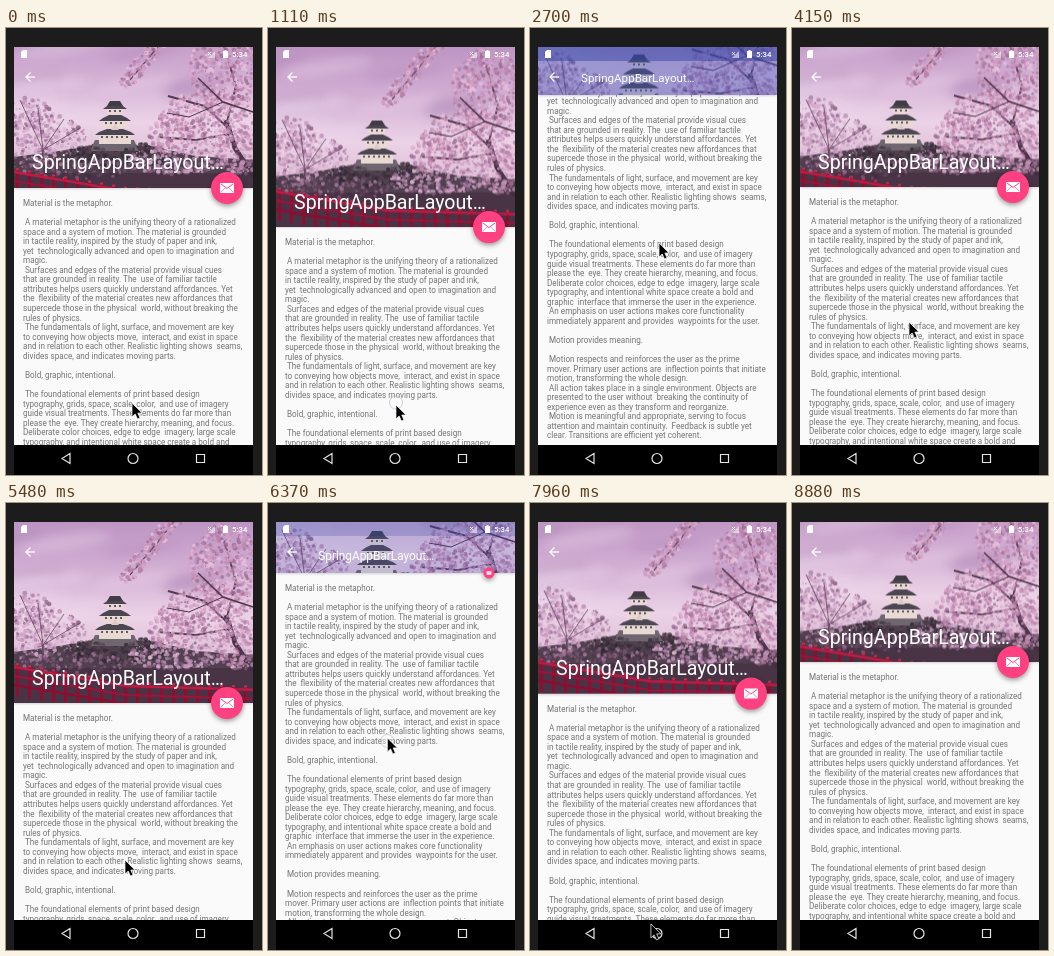
Animation of 256x447 px, one loop 9.34 s. Source, as an HTML page with a canvas:

```html
<!DOCTYPE html>
<html lang="en">
<head>
<meta charset="utf-8">
<title>Spring app bar</title>
<style>
  html, body { margin: 0; width: 100%; height: 100%; overflow: hidden; background: #1c1c1c; }
  canvas { display: block; width: 256px; height: 447px; }
</style>
</head>
<body>
<canvas id="stage"></canvas>
<script>
const W = 256, H = 447, LOOP = 9340;
const LEFT = 8, TOP = 19, RIGHT = 247, BOTTOM = 417, WIDE = RIGHT - LEFT;
const EXPANDED = 159, COLLAPSED = 67;
const LINE = 9.55;
const canvas = document.getElementById('stage');
const dpr = window.devicePixelRatio || 1;
canvas.width = W * dpr;
canvas.height = H * dpr;
const ctx = canvas.getContext('2d');

const copy = `Material is the metaphor.

 A material metaphor is the unifying theory of a rationalized
space and a system of motion. The material is grounded
in tactile reality, inspired by the study of paper and ink,
yet  technologically advanced and open to imagination and
magic.
 Surfaces and edges of the material provide visual cues
that are grounded in reality. The  use of familiar tactile
attributes helps users quickly understand affordances. Yet
the  flexibility of the material creates new affordances that
supercede those in the physical  world, without breaking the
rules of physics.
 The fundamentals of light, surface, and movement are key
to conveying how objects move,  interact, and exist in space
and in relation to each other. Realistic lighting shows  seams,
divides space, and indicates moving parts.

 Bold, graphic, intentional.

 The foundational elements of print based design
typography, grids, space, scale, color,  and use of imagery
guide visual treatments. These elements do far more than
please the  eye. They create hierarchy, meaning, and focus.
Deliberate color choices, edge to edge  imagery, large scale
typography, and intentional white space create a bold and
graphic  interface that immerse the user in the experience.
 An emphasis on user actions makes core functionality
immediately apparent and provides  waypoints for the user.

 Motion provides meaning.

 Motion respects and reinforces the user as the prime
mover. Primary user actions are  inflection points that initiate
motion, transforming the whole design.
 All action takes place in a single environment. Objects are
presented to the user without  breaking the continuity of
experience even as they transform and reorganize.
 Motion is meaningful and appropriate, serving to focus
attention and maintain continuity.  Feedback is subtle yet
clear. Transitions are efficient yet coherent.`.split('\n');

// Each key: [ms, value, ease into it]
const linear = k => k;
const out = k => 1 - (1 - k) ** 3;
const soft = k => k * k * (3 - 2 * k);
const headerKeys = [
  [0, 160], [80, 159], [520, 159], [1080, 199, out], [1300, 199.5], [1800, 159, out],
  [2130, 159], [2480, 67], [3380, 67], [3800, 159, out], [4600, 159],
  [5300, 200, out], [5520, 200], [5950, 159, out], [6100, 159], [6380, 67],
  [6860, 67], [7130, 159], [7340, 180, out], [7800, 197, out], [7930, 197], [8450, 159, out]];
const scrollKeys = [
  [2480, 0], [2700, -56.5], [2850, -61, out], [3150, -61], [3380, 0],
  [6380, 0], [6520, -50, out], [6650, -50], [6860, 0]];
const scrimKeys = [
  [2430, 0], [3030, 1], [3540, 1], [4100, 0], [6250, 0], [6750, 0.9], [6990, 0.9], [7640, 0]];
const fabKeys = [
  [2330, 1], [2530, 0], [3520, 0], [3720, 1], [6240, 1], [6440, 0], [6980, 0], [7180, 1]];
const xKeys = [
  [0, 126], [480, 127], [1100, 128], [1900, 125], [2130, 125], [2700, 129], [3150, 129],
  [4150, 117, soft], [5480, 119], [7900, 120], [8850, 197, soft], [8900, 204]];
const yKeys = [
  [0, 375], [480, 245, soft], [1100, 377, soft], [2130, 377], [2700, 215], [3150, 215],
  [3800, 372, soft], [4150, 294], [4500, 240, soft], [4600, 240], [5300, 357, soft],
  [5520, 357], [6050, 382, soft], [6100, 382], [6520, 228, out], [6650, 228],
  [7320, 386, soft], [7850, 420, soft], [8850, 446, soft], [8900, 452]];
const presses = [[520, 1300], [2130, 2680], [3150, 3800], [4600, 5440], [6100, 6500], [6650, 7900]];

function at(keys, t) {
  if (t <= keys[0][0]) return keys[0][1];
  for (let i = 1; i < keys.length; i++) {
    const [t0, v0] = keys[i - 1], [t1, v1, ease = linear] = keys[i];
    if (t < t1) return v0 + (v1 - v0) * ease((t - t0) / (t1 - t0));
  }
  return keys[keys.length - 1][1];
}

function seeded(seed) {
  return () => (seed = (seed * 16807) % 2147483647) / 2147483647;
}

function poly(c, color, ...pts) {
  c.fillStyle = color;
  c.beginPath();
  for (let i = 0; i < pts.length; i += 2) c.lineTo(pts[i], pts[i + 1]);
  c.fill();
}

function stroke(c, color, width, ...pts) {
  c.strokeStyle = color;
  c.lineWidth = width;
  c.beginPath();
  for (let i = 0; i < pts.length; i += 2) c.lineTo(pts[i], pts[i + 1]);
  c.stroke();
}

function disc(c, color, x, y, r) {
  c.fillStyle = color;
  c.beginPath();
  c.arc(x, y, r, 0, 7);
  c.fill();
}

// Soft speckled cluster of petals
function petals(c, rnd, x, y, rx, ry, count, colors) {
  for (let i = 0; i < count; i++) {
    const a = rnd() * 6.283, d = Math.sqrt(rnd());
    c.globalAlpha = 0.45 + rnd() * 0.4;
    disc(c, colors[i % colors.length], x + Math.cos(a) * d * rx, y + Math.sin(a) * d * ry, 0.7 + rnd() * 1.7);
  }
  c.globalAlpha = 1;
}

function castle(c) {
  poly(c, '#6f6670', 84, 143, 89, 132, 128, 132, 133, 143);
  const tiers = [[96, 8, 7], [108, 12, 9], [122, 16, 11]];
  for (const [y, half, tall] of tiers) {
    c.fillStyle = '#e8d9d3';
    c.fillRect(109 - half, y + 3, half * 2, tall);
    c.fillStyle = '#625765';
    for (let x = 111 - half; x < 107 + half; x += 5) c.fillRect(x, y + 6, 2, 2);
    poly(c, '#4c4650', 105 - half, y + 5, 109 - half, y + 2, 109 - half * 0.5, y - 1,
      109 + half * 0.5, y - 1, 109 + half, y + 2, 113 + half, y + 5);
  }
  poly(c, '#403b45', 101, 98, 104, 93, 114, 93, 117, 98);
  poly(c, '#dccac8', 105, 122, 109, 116, 113, 122);
}

function fence(c) {
  const rail = x => x < 120 ? 164 + (x - 8) * 0.17 : 183 + (x - 120) * 0.03;
  for (let x = 10; x < RIGHT; x += 12) {
    const y = rail(x);
    c.fillStyle = '#8f0d31';
    c.fillRect(x, y - 3, 3, 32);
    c.fillStyle = '#d02a50';
    c.fillRect(x, y - 4, 3, 2);
  }
  for (const [dy, w, color] of [[0, 2.6, '#c01a43'], [9, 2, '#a11238'], [18, 2.4, '#8d0d30']])
    stroke(c, color, w, 8, rail(8) + dy, 120, 183 + dy, RIGHT, rail(RIGHT) + dy);
}

// Scenery, laid out for a header that ends at y = 200
function paintScene() {
  const pic = document.createElement('canvas');
  pic.width = W * dpr;
  pic.height = 230 * dpr;
  const c = pic.getContext('2d'), rnd = seeded(77);
  c.scale(dpr, dpr);
  const sky = c.createLinearGradient(0, 10, 0, 150);
  sky.addColorStop(0, '#b990bf');
  sky.addColorStop(0.4, '#d2aed4');
  sky.addColorStop(0.75, '#ecd3e7');
  sky.addColorStop(1, '#dfc0d8');
  c.fillStyle = sky;
  c.fillRect(0, 0, W, 230);
  c.filter = 'blur(5px)';
  for (let i = 0; i < 14; i++) {
    c.globalAlpha = 0.3;
    c.fillStyle = i % 3 ? '#f0dcf0' : '#a57fb0';
    c.beginPath();
    c.ellipse(rnd() * 190, 25 + rnd() * 85, 30 + rnd() * 25, 4 + rnd() * 5, -0.15, 0, 7);
    c.fill();
  }
  c.filter = 'none';
  c.globalAlpha = 1;

  const mauve = ['#b988b1', '#d0a2c7', '#8f6389', '#deb9d5'];
  const pink = ['#d39dc1', '#e9c1dc', '#b77fa8', '#c68fb6', '#9a6791'];
  const dark = ['#382d3a', '#4b3d48', '#2c2932', '#594453'];
  poly(c, '#51404f', 8, 149, 60, 142, 90, 137, 145, 138, 190, 148, 247, 152, 247, 230, 8, 230);
  petals(c, rnd, 32, 129, 48, 25, 390, mauve);
  petals(c, rnd, 22, 106, 25, 16, 110, mauve);
  for (const [x, y] of [[14, 92], [32, 100], [58, 111], [74, 120]])
    stroke(c, '#67485f', 0.8, 36, 164, 37, 142, x, y);
  petals(c, rnd, 112, 148, 54, 12, 260, dark);
  castle(c);
  petals(c, rnd, 84, 147, 18, 8, 65, dark);
  petals(c, rnd, 139, 145, 20, 10, 80, dark);
  petals(c, rnd, 68, 160, 62, 11, 190, ['#795571', '#a97a9d', '#4b374a']);
  petals(c, rnd, 171, 153, 50, 14, 240, mauve);

  stroke(c, '#4d344a', 5, 247, 168, 229, 140, 220, 112);
  stroke(c, '#56394f', 2.2, 220, 118, 198, 98, 162, 88);
  stroke(c, '#56394f', 1.8, 224, 126, 190, 132, 152, 129);
  stroke(c, '#56394f', 2, 221, 114, 230, 78, 218, 38);
  petals(c, rnd, 220, 61, 36, 40, 500, pink);
  petals(c, rnd, 205, 111, 52, 29, 560, pink);
  petals(c, rnd, 166, 127, 23, 19, 150, pink);
  petals(c, rnd, 233, 147, 20, 20, 150, pink);
  stroke(c, '#51354b', 1.5, 247, 104, 217, 94, 192, 70);
  stroke(c, '#51354b', 1, 217, 94, 183, 109, 161, 105);

  stroke(c, '#61445d', 1.2, 176, 8, 151, 40, 124, 72);
  for (let i = 0; i < 7; i++)
    petals(c, rnd, 167 - i * 7.5, 18 + i * 9, 9, 7, 30, pink);
  c.fillStyle = 'rgba(55,25,50,.3)';
  c.fillRect(0, 165, W, 65);
  fence(c);
  return pic;
}
const scene = paintScene();

function drawText(h, scroll) {
  ctx.fillStyle = '#fafafa';
  ctx.fillRect(LEFT, TOP, WIDE, BOTTOM - TOP);
  ctx.font = '8.15px Roboto, sans-serif';
  ctx.fillStyle = '#747474';
  copy.forEach((line, i) => ctx.fillText(line, 17, h + scroll + 18 + i * LINE));
}

function drawStatus() {
  ctx.fillStyle = '#fff';
  poly(ctx, '#fff', 15, 24, 17, 22, 21, 22, 21, 30, 15, 30);
  poly(ctx, 'rgba(255,255,255,.55)', 202, 30, 209, 23, 209, 30);
  stroke(ctx, '#fff', 0.8, 202, 24, 205, 27);
  stroke(ctx, '#fff', 0.8, 205, 24, 202, 27);
  ctx.fillStyle = '#fff';
  ctx.fillRect(217, 23, 5, 7);
  ctx.fillRect(218.5, 22, 2, 1);
  ctx.font = '500 7.8px Roboto, sans-serif';
  ctx.fillText('5:34', 226, 29);
}

function drawHeader(h, scrim) {
  ctx.save();
  ctx.shadowColor = 'rgba(0,0,0,.3)';
  ctx.shadowBlur = 3 * dpr;
  ctx.fillStyle = '#8d6b90';
  ctx.fillRect(LEFT, TOP, WIDE, h - TOP);
  ctx.restore();
  ctx.save();
  ctx.beginPath();
  ctx.rect(LEFT, TOP, WIDE, h - TOP);
  ctx.clip();
  ctx.drawImage(scene, 0, (h - 200) / 2, W, 230);
  ctx.globalAlpha = scrim;
  ctx.fillStyle = '#3f51b5';
  ctx.fillRect(LEFT, TOP, WIDE, h - TOP);
  ctx.fillStyle = '#303f9f';
  ctx.fillRect(LEFT, TOP, WIDE, 14);
  ctx.globalAlpha = 1;

  const fold = Math.max(0, (EXPANDED - h) / (EXPANDED - COLLAPSED));
  ctx.font = `${19.6 - 8 * fold}px Roboto, sans-serif`;
  ctx.fillStyle = '#fff';
  ctx.fillText('SpringAppBarLayout…', 26 + 25 * fold, h - 18.5 + 5.5 * fold);
  ctx.restore();

  stroke(ctx, '#fff', 1.3, 29, 49, 20, 49);
  stroke(ctx, '#fff', 1.3, 24.5, 44.5, 20, 49, 24.5, 53.5);
  drawStatus();
}

function drawFab(y, scale) {
  if (scale <= 0) return;
  ctx.save();
  ctx.translate(221, y);
  ctx.scale(scale, scale);
  ctx.save();
  ctx.shadowColor = 'rgba(0,0,0,.4)';
  ctx.shadowBlur = 5 * dpr;
  ctx.shadowOffsetY = 2 * dpr;
  disc(ctx, '#ff4081', 0, 0, 16);
  ctx.restore();
  ctx.fillStyle = '#fff';
  ctx.beginPath();
  ctx.roundRect(-7, -5, 14, 10, 1);
  ctx.fill();
  stroke(ctx, '#ff4081', 1, -6, -4, 0, 0.5, 6, -4);
  stroke(ctx, '#ff4081', 0.6, -6, 4, -2, 0);
  stroke(ctx, '#ff4081', 0.6, 6, 4, 2, 0);
  ctx.restore();
}

function drawFrame() {
  ctx.fillStyle = '#1c1c1c';
  ctx.fillRect(0, 0, W, TOP);
  ctx.fillRect(0, 0, LEFT, H);
  ctx.fillRect(RIGHT, 0, W - RIGHT, H);
  ctx.fillStyle = '#000';
  ctx.fillRect(LEFT, BOTTOM, WIDE, H - BOTTOM);
  ctx.strokeStyle = '#e4e4e4';
  ctx.lineWidth = 1.2;
  ctx.beginPath();
  ctx.moveTo(64, 425.5);
  ctx.lineTo(56, 430.5);
  ctx.lineTo(64, 435.5);
  ctx.closePath();
  ctx.moveTo(132, 430.5);
  ctx.arc(127, 430.5, 5, 0, 7);
  ctx.rect(190.5, 426.5, 8, 8);
  ctx.stroke();
}

function drawPointer(t) {
  const x = at(xKeys, t), y = at(yKeys, t);
  if (presses.some(([a, b]) => t >= a && t < b)) {
    const back = Math.max(0, t - 30);
    ctx.beginPath();
    ctx.arc(at(xKeys, back), at(yKeys, back) - 2, 6.5, 0, 7);
    ctx.fillStyle = 'rgba(255,255,255,.35)';
    ctx.fill();
    ctx.strokeStyle = 'rgba(150,150,185,.55)';
    ctx.lineWidth = 0.8;
    ctx.stroke();
  }
  if (y > H) return;
  ctx.save();
  ctx.translate(x, y);
  ctx.beginPath();
  for (const [px, py] of [[0, 0], [0, 14], [3.2, 11], [5.5, 16], [8, 15], [5.8, 10], [10, 10]])
    ctx.lineTo(px, py);
  ctx.closePath();
  ctx.fillStyle = '#000';
  ctx.fill();
  ctx.strokeStyle = '#fff';
  ctx.lineWidth = 0.7;
  ctx.stroke();
  ctx.restore();
}

function render(now) {
  const t = now % LOOP, h = at(headerKeys, t);
  ctx.setTransform(dpr, 0, 0, dpr, 0, 0);
  drawText(h, at(scrollKeys, t));
  drawHeader(h, at(scrimKeys, t));
  drawFab(h, at(fabKeys, t));
  drawFrame();
  drawPointer(t);
  requestAnimationFrame(render);
}
requestAnimationFrame(render);
</script>
</body>
</html>
```
